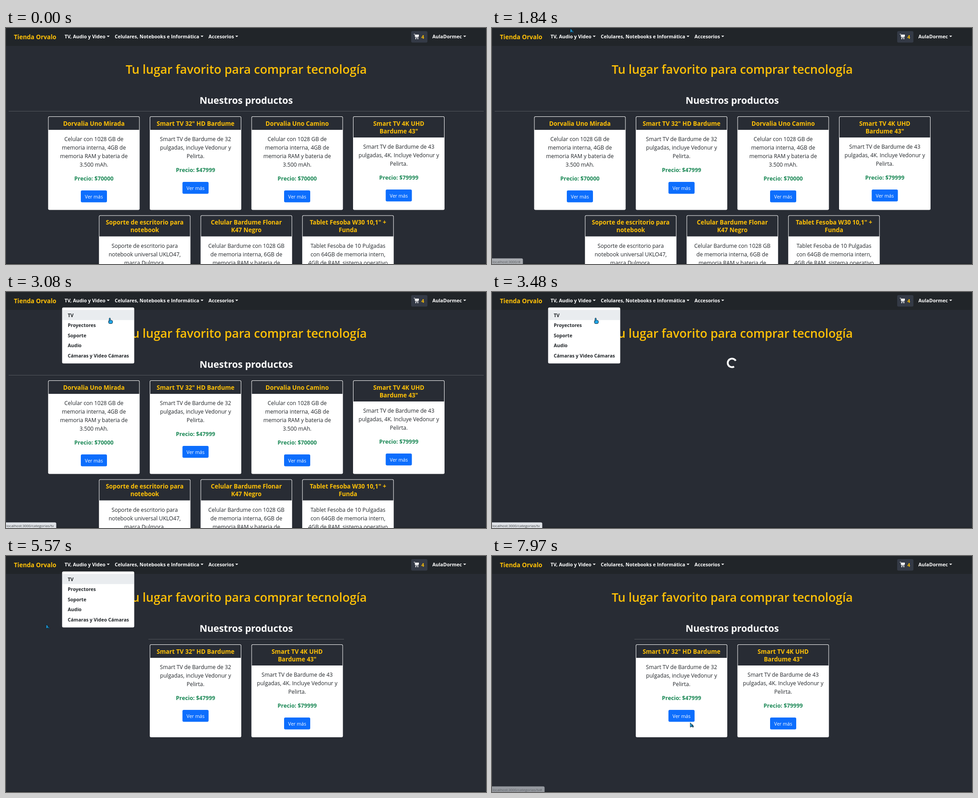
An HTML page with a canvas for the animation above (8000 ms loop, 1065 px wide and 526 px high).

```html
<!DOCTYPE html>
<html lang="es">
<head>
<meta charset="utf-8">
<title>Tienda</title>
<style>
html, body { margin: 0; width: 100%; height: 100%; overflow: hidden; background: #282c34; }
canvas { display: block; width: 1065px; height: 526px; }
</style>
</head>
<body>
<canvas id="stage" width="1065" height="526"></canvas>
<script>
const ctx = document.getElementById('stage').getContext('2d');
const W = 1065, H = 526, MID = W / 2, LOOP = 8000;
const FONT = '"Open Sans", "Noto Sans", sans-serif';
const BG = '#282c34', DARK = '#212529', YELLOW = '#ffc107', GREEN = '#198754', BLUE = '#0d6efd';
const CURSOR = '#22a7e8', OUTLINE = '#0d2433';

const CARD_W = 203, CARD_PITCH = 225.5, LINE = 19, TITLE_LINE = 17;
const MENU = { x: 125, y: 40, w: 159, row: 22.6 };
const NAV_LINK = { x: 125, y: 2, w: 113, h: 31 };

const OPEN = 2200, PICK = 3300, LOADING = 3480, LOADED = 5500, BLUR = 5980, CLOSE = 6260;
const HINT_HOLD = 230, HINT_FADE = 200;

const phone = 'Celular con 1028 GB de|memoria interna, 4GB de|memoria RAM y bateria de|3.500 mAh.';
const product = (title, text, price) => ({ title: title.split('|'), lines: text.split('|'), price });
const tv32 = product('Smart TV 32" HD Bardume',
  'Smart TV de Bardume de 32|pulgadas, incluye Vedonur y|Pelirta.', 47999);
const tv43 = product('Smart TV 4K UHD|Bardume 43"',
  'Smart TV de Bardume de 43|pulgadas, 4K. Incluye Vedonur y|Pelirta.', 79999);
const topRow = [
  product('Dorvalia Uno Mirada', phone, 70000), tv32,
  product('Dorvalia Uno Camino', phone, 70000), tv43
];
const bottomRow = [
  product('Soporte de escritorio para|notebook',
    'Soporte de escritorio para|notebook universal UKLO47,|marca Dulmora.'),
  product('Celular Bardume Flonar|K47 Negro',
    'Celular Bardume con 1028 GB|de memoria interna, 6GB de|memoria RAM y bateria de'),
  product('Tablet Fesoba W30 10,1" +|Funda',
    'Tablet Fesoba de 10 Pulgadas|con 64GB de memoria intern,|4GB de RAM, sistema operativo')
];
const menu = ['TV', 'Proyectores', 'Soporte', 'Audio', 'Cámaras y Video Cámaras'];

// Pointer stops: time, x, y
const stops = [
  [190, 947, 480], [960, 190, 34], [1570, 174, 1], [1840, 174, 1], [OPEN, 180, 18],
  [2800, 222, 72], [3080, 230, 58], [4240, 229, 58], [4700, 130, 104], [5010, -2, 183],
  [5150, -2, 183], [5350, 50, 50], [5910, 150, 310], [CLOSE, 175, 316], [6530, 190, 185],
  [7000, 160, 14], [7650, 156, 17], [7830, 510, 270], [7970, 440, 372], [LOOP, 440, 372]
];

function text(str, x, y, size, color, weight = 400, align = 'left') {
  ctx.font = `${weight} ${size}px ${FONT}`;
  ctx.fillStyle = color;
  ctx.textAlign = align;
  ctx.fillText(str, x, y);
  return ctx.measureText(str).width;
}

function box(x, y, w, h, color, radius = 0, outline) {
  ctx.fillStyle = color;
  ctx.beginPath();
  ctx.roundRect(x, y, w, h, radius);
  ctx.fill();
  if (!outline) return;
  ctx.strokeStyle = outline;
  ctx.lineWidth = 1;
  ctx.stroke();
}

function triangle(x, y, dx1, dy1, dx2, dy2, color) {
  ctx.beginPath();
  ctx.moveTo(x, y);
  ctx.lineTo(x + dx1, y + dy1);
  ctx.lineTo(x + dx2, y + dy2);
  ctx.closePath();
  ctx.fillStyle = color;
  ctx.fill();
}

// Draws a link with its caret and returns where the next one starts.
function navLink(label, x) {
  const end = x + text(label, x, 23, 10.65, '#fff', 700) + 3;
  triangle(end, 17, 6.4, 0, 3.2, 3.2, '#fff');
  return end + 17.6;
}

function cart() {
  box(899, 7, 36, 25.5, '#343a46', 3);
  box(904.8, 13.2, 2.6, 1.2, '#fff');
  box(907, 14.8, 9, 5.2, '#fff', [0, 0, 2, 2]);
  box(908, 20.8, 7, 1.2, '#fff');
  for (const x of [908, 912.6]) box(x, 22.6, 2.4, 2.4, '#fff', 1.2);
  text('4', 921.5, 24, 11, YELLOW, 700);
}

function navbar() {
  box(0, 0, W, 40, DARK);
  text('Tienda Orvalo', 17.5, 25, 13.5, YELLOW, 700);
  ['TV, Audio y Video', 'Celulares, Notebooks e Informática', 'Accesorios']
    .reduce((x, label) => navLink(label, x), 130);
  cart();
  navLink('AulaDormec', 946);
}

function card(x, y, h, { title, lines, price }) {
  const mid = x + CARD_W / 2, extra = (title.length - 1) * TITLE_LINE;
  box(x, y, CARD_W, h, '#fff', 3);
  box(x + 1, y + 1, CARD_W - 2, 29 + extra, BG, [2, 2, 0, 0]);
  title.forEach((s, i) => text(s, mid, y + 20.6 + i * TITLE_LINE, 13.3, YELLOW, 700, 'center'));
  lines.forEach((s, i) => text(s, mid, y + 55 + extra + i * LINE, 12.1, DARK, 400, 'center'));
  if (!price) return;
  const below = y + extra + lines.length * LINE;
  text('Precio: $' + price, mid, below + 66.5, 12.3, GREEN, 700, 'center');
  box(mid - 29, below + 89, 58, 26.5, BLUE, 3);
  text('Ver más', mid, below + 106.5, 10.6, '#fff', 400, 'center');
}

function cardRow(list, y, h) {
  const left = MID + 0.75 - ((list.length - 1) * CARD_PITCH + CARD_W) / 2;
  list.forEach((item, i) => card(left + i * CARD_PITCH, y, h, item));
}

function catalogue(filtered) {
  text('Nuestros productos', 533, 169, 21.05, '#fff', 700, 'center');
  const rule = filtered ? 434 : 1054;
  box(533 - rule / 2, 185, rule, 1, '#54575d');
  if (filtered) {
    cardRow([tv32, tv43], 197, 207);
  } else {
    cardRow(topRow, 197, 208.5);
    cardRow(bottomRow, 417.5, 130);
  }
}

function spinner(t) {
  const gap = (15 + (t - LOADING) * 360 / 781) * Math.PI / 180;
  ctx.strokeStyle = '#fff';
  ctx.lineWidth = 4;
  ctx.beginPath();
  ctx.arc(MID, 158, 9.5, gap + Math.PI / 4, gap + Math.PI * 7 / 4);
  ctx.stroke();
}

function pointerAt(t) {
  const i = stops.findIndex(stop => stop[0] > t);
  if (i < 1) return { x: -50, y: -50 };
  const [t0, x0, y0] = stops[i - 1], [t1, x1, y1] = stops[i];
  const k = (t - t0) / (t1 - t0);
  return { x: x0 + (x1 - x0) * k, y: y0 + (y1 - y0) * k };
}

const menuOpen = t => t >= OPEN && t < CLOSE;

function menuRowAt(t) {
  const { x, y } = pointerAt(t);
  const inside = menuOpen(t) && x >= MENU.x && x < MENU.x + MENU.w;
  return inside ? Math.floor((y - MENU.y) / MENU.row) : -1;
}

function linkAt(t) {
  const item = menu[menuRowAt(t)];
  if (item) return 'categorias/' + item.split(' ')[0].toLowerCase();
  const { x, y } = pointerAt(t);
  const dx = x - NAV_LINK.x, dy = y - NAV_LINK.y;
  const onNav = dx >= 0 && dx < NAV_LINK.w && dy >= 0 && dy < NAV_LINK.h;
  return onNav && (t < LOADING ? '#' : 'categorias/tv#');
}

function dropdown(t) {
  box(124.5, 34.5, 160, 124.8, '#fff', 3);
  menu.forEach((label, i) => {
    const top = MENU.y + i * MENU.row;
    const focused = i === 0 && t >= PICK && t < BLUR;
    if (focused || i === menuRowAt(t)) box(MENU.x, top, MENU.w, MENU.row, '#e9ecef');
    text(label, 137, top + 15.6, 10.55, DARK, 700);
  });
}

function drawPointer({ x, y }, hand) {
  ctx.save();
  ctx.translate(x, y);
  if (hand) {
    box(-2.5, 5, 9, 7.5, CURSOR, 3, OUTLINE);
    box(-1, 0, 2.6, 8, CURSOR, 1.3, OUTLINE);
    box(-0.5, 5.5, 6, 6, CURSOR, 2);
  } else {
    triangle(-0.5, -1, 0, 11, 8, 8, OUTLINE);
    triangle(0.3, 1, 0, 7.5, 5.5, 5.5, CURSOR);
    ctx.rotate(-0.45);
    box(0.6, 6, 2, 5, CURSOR, 0, OUTLINE);
  }
  ctx.restore();
}

// The address bubble lingers and fades after the pointer leaves a link.
function hint(t) {
  let age = 0, link = linkAt(t);
  while (!link && age < HINT_HOLD + HINT_FADE) link = linkAt(t - (age += 10));
  if (!link) return;
  const address = 'localhost:3000/' + link;
  ctx.globalAlpha = Math.max(0, Math.min(1, 1 - (age - HINT_HOLD) / HINT_FADE));
  ctx.font = `400 8px ${FONT}`;
  box(0, 513.5, ctx.measureText(address).width + 6.5, 13, '#dee1e6', [0, 3, 0, 0]);
  text(address, 1, 523.5, 8, '#3c4043');
  ctx.globalAlpha = 1;
}

function draw(t) {
  box(0, 0, W, H, BG);
  box(0, 524, W, 2, '#20242a');
  text('Tu lugar favorito para comprar tecnología', 533, 101.5, 26.7, YELLOW, 600, 'center');
  if (t >= LOADING && t < LOADED) spinner(t);
  else catalogue(t >= LOADED);
  navbar();
  if (menuOpen(t)) dropdown(t);
  hint(t);
  drawPointer(pointerAt(t), linkAt(t));
}

function frame(now) {
  draw(now % LOOP);
  requestAnimationFrame(frame);
}
requestAnimationFrame(frame);
</script>
</body>
</html>
```
